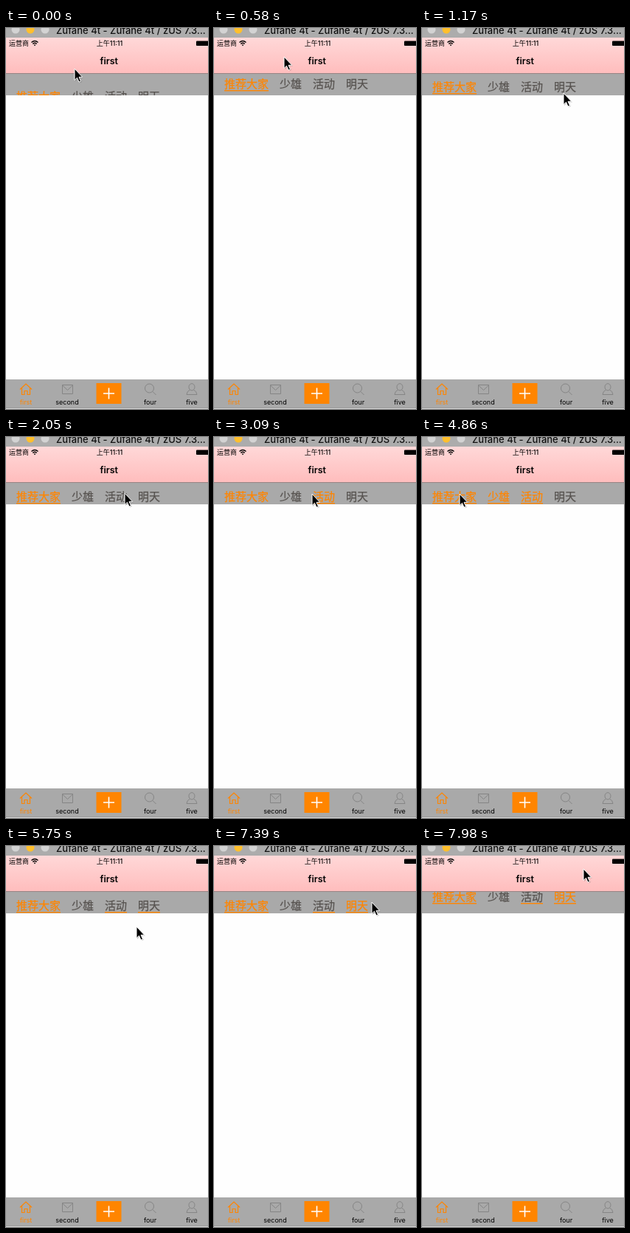
An HTML page that plays this animation: 274x515 px, repeating every 8 s.

```html
<!DOCTYPE html>
<html lang="zh">
<head>
<meta charset="utf-8">
<title>Tab menu</title>
<style>
  html, body { margin: 0; width: 100%; height: 100%; overflow: hidden; background: #fefefe; }
  svg { display: block; width: 274px; height: 515px; }
  text { font-family: Inter, "Noto Sans CJK SC", "Noto Sans CJK", sans-serif; }
  .mid { text-anchor: middle; }
  .tab { font-size: 9px; text-anchor: middle; }
  .menu {
    font: 15px "Noto Sans CJK SC", "Noto Sans CJK", sans-serif;
    fill: currentColor; stroke: currentColor; stroke-width: .25;
  }
  .icon { fill: none; stroke: #858585; stroke-width: 1; }
</style>
</head>
<body>
<svg viewBox="0 0 274 515">
  <defs>
    <linearGradient id="pink" x2="0" y2="1">
      <stop stop-color="#ffd8d8"/><stop offset="1" stop-color="#ffbdbd"/>
    </linearGradient>
    <clipPath id="strip"><rect y="62" width="274" height="29"/></clipPath>
  </defs>
  <rect width="274" height="515" fill="#fefefe"/>

  <!-- window title -->
  <rect width="274" height="13" fill="#acacac"/>
  <g fill="#d3d3d3">
    <circle cx="13" cy="2" r="5.5"/><circle cx="53" cy="2" r="5.5"/>
    <circle cx="33" cy="2" r="5.5" fill="#ffbf2d"/>
  </g>
  <text x="68" y="8" font-size="13" font-weight="500" fill="#111">Zufane 4t - Zufane 4t / zUS 7.3...</text>

  <!-- status and navigation bar -->
  <rect y="13" width="274" height="48" fill="url(#pink)"/>
  <rect y="61" width="274" height="1" fill="#968484"/>
  <text x="4" y="24" font-size="9">运营商</text>
  <g fill="none" stroke="#000" stroke-width="1.3">
    <path d="M34.5 19.6Q39 15.4 43.5 19.6M36.3 21.5Q39 19 41.7 21.5"/>
    <path d="M37.6 22.8L39 24.2L40.4 22.8Q39 21.6 37.6 22.8Z" fill="#000" stroke="none"/>
  </g>
  <text class="mid" x="140.5" y="24" font-size="9" font-weight="500">上午11:11</text>
  <rect x="258" y="17.5" width="18" height="6.5" rx="1"/>
  <text class="mid" x="139.7" y="49" font-size="12.5" font-weight="600">first</text>

  <!-- menu strip -->
  <rect y="62" width="274" height="29" fill="#a9a9a9"/>
  <g clip-path="url(#strip)"><g id="menu"></g></g>

  <!-- tab bar -->
  <rect y="475" width="274" height="38" fill="#a9a9a9"/>
  <rect y="513" width="274" height="1" fill="#999"/>
  <rect y="514" width="274" height="1" fill="#d8d8d8"/>
  <g class="icon">
    <path stroke="#ff8500" stroke-width="1.2" d="M19 488.5L27 481L35 488.5M21.5 486.5V495.5H25V490.5H29V495.5H32.5V486.5"/>
    <path d="M76.5 482.5H90.5V494.5H76.5ZM76.5 483L83.5 489.5L90.5 483"/>
    <circle cx="194.5" cy="487" r="6"/>
    <path d="M199 491.5L203.5 496"/>
    <ellipse cx="252" cy="485.3" rx="4" ry="4.6"/>
    <path d="M249.6 489.2Q245.5 490.5 245 495.5H259Q258.5 490.5 254.4 489.2"/>
  </g>
  <rect x="122.5" y="480" width="34" height="28" fill="#ff8500"/>
  <path d="M132 494H147M139.5 486.5V501.5" stroke="#fff" stroke-width="1.6"/>
  <text class="tab" x="27" y="508.8" fill="#ff8500">first</text>
  <text class="tab" x="83" y="508.8">second</text>
  <text class="tab" x="195.5" y="508.8">four</text>
  <text class="tab" x="252" y="508.8">five</text>

  <g id="cursor">
    <path d="M1 1V17L4.5 13.5L7 19L10 18L7.5 12.5H12Z" opacity=".18"/>
    <path d="M0 0V15.5L3.5 12.2L6 18L8.5 17L6 11.3H10.7Z" stroke="#fff"/>
  </g>
</svg>
<script>
const LOOP = 8000, TICK = 147.6, LEAD = 20;
const ORANGE = '#ff8500', DARK = '#575350';
const RELEASE = 580, REGRAB = 7540, GRIP_Y = 43;
const menu = document.getElementById('menu');
const cursor = document.getElementById('cursor');

// lit: orange between these times; lined: underlined between them.
const items = [
  { label: '推荐大家', lit: [0, LOOP], lined: [4560, 2640] },
  { label: '少雄', lit: [3820, 5000], lined: [3820, 5000] },
  { label: '活动', lit: [3090, 5300], lined: [2640, LOOP] },
  { label: '明天', lit: [6630, LOOP], lined: [5600, LOOP] }
];

// Where the pointer arrives, and when.
const stops = [
  { at: 0, x: 93, y: 55 },
  { at: 290, x: 93, y: 38 },
  { at: 1170, x: 192, y: 88 },
  { at: 2050, x: 161, y: 76 },
  { at: 2490, x: 133, y: 77 },
  { at: 3530, x: 122, y: 77 },
  { at: 4270, x: 51, y: 77 },
  { at: 5600, x: 196, y: 78 },
  { at: 5750, x: 177, y: 109 },
  { at: 5900, x: 117, y: 107 },
  { at: 6200, x: 187, y: 77 },
  { at: 7390, x: 214, y: 76 },
  { at: 7970, x: 219, y: 31 }
];

function add(tag, attrs) {
  const el = document.createElementNS('http://www.w3.org/2000/svg', tag);
  for (const name in attrs) el.setAttribute(name, attrs[name]);
  return menu.appendChild(el);
}

let left = 14;
for (const item of items) {
  const width = 15 * item.label.length;
  item.text = add('text', { x: left, y: 86, class: 'menu' });
  item.text.textContent = item.label;
  item.rule = add('rect', { x: left, y: 89, width, height: 1.4, fill: ORANGE });
  left += width + 15;
}

// A span whose start is after its end wraps around the loop.
const within = (t, [start, end]) =>
  start < end ? t >= start && t < end : t >= start || t < end;

const ease = p => (1 - Math.cos(Math.PI * p)) / 2;

// Longer moves take longer, and each one ends on its arrival time.
function pointerAt(t) {
  const next = stops.findIndex(stop => stop.at > t);
  if (next < 0) return stops.at(-1);
  const from = stops[next - 1], to = stops[next];
  const dx = to.x - from.x, dy = to.y - from.y;
  const duration = Math.min(to.at - from.at, 300 + 3 * Math.hypot(dx, dy));
  const p = ease(Math.max(0, 1 - (to.at - t) / duration));
  return { x: from.x + dx * p, y: from.y + dy * p };
}

// The menu follows the pointer while held, then settles back.
function scrollAt(t, y) {
  if (t < RELEASE) return y - GRIP_Y;
  if (t >= REGRAB) return Math.min(0, y - GRIP_Y);
  return -5 * Math.exp((RELEASE - t) / 400);
}

function draw(t) {
  const { x, y } = pointerAt(t);
  cursor.setAttribute('transform', `translate(${Math.round(x)} ${Math.round(y)})`);
  menu.setAttribute('transform', `translate(0 ${Math.round(scrollAt(t, y))})`);
  for (const { text, rule, lit, lined } of items) {
    text.style.color = within(t, lit) ? ORANGE : DARK;
    rule.style.opacity = within(t, lined) ? 1 : 0;
  }
}

const began = performance.now();
function frame() {
  const t = (performance.now() - began) % LOOP;
  draw(Math.floor((t + LEAD) / TICK) * TICK);
  requestAnimationFrame(frame);
}
frame();
</script>
</body>
</html>
```
